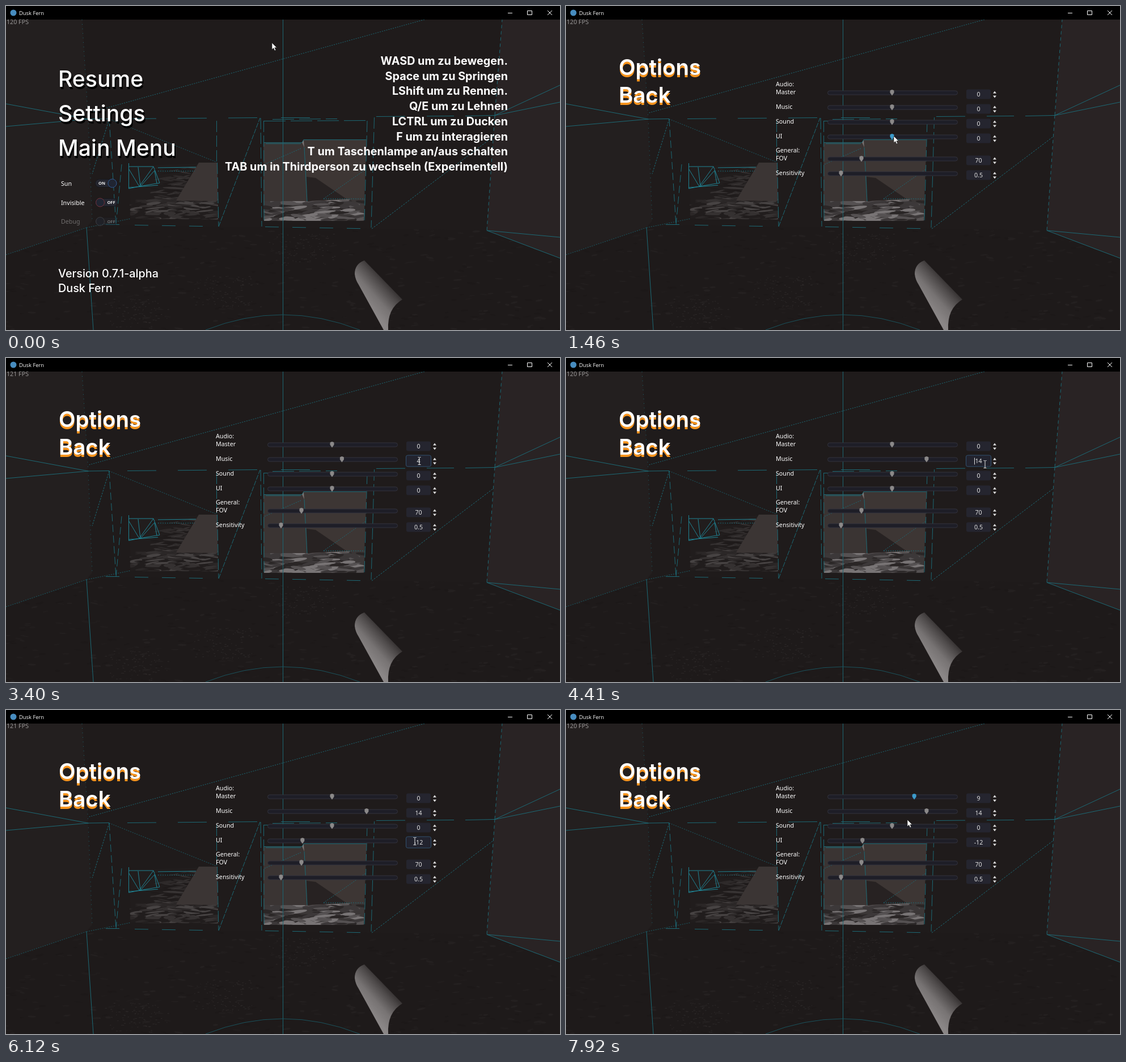
These frames come from a looping animation (977 by 573 pixels, 7990 ms). An HTML page with a canvas:

```html
<!DOCTYPE html>
<html lang="de">
<head>
<meta charset="utf-8">
<title>Dusk Fern</title>
<style>
html, body { margin: 0; width: 100%; height: 100%; overflow: hidden; background: #000; }
canvas { display: block; }
</style>
</head>
<body>
<canvas id="stage" width="977" height="573"></canvas>
<script>
const W = 977, H = 573, BAR = 24, LOOP = 7990;
const GAME = 'Dusk Fern';
const UI_FONT = '10.7px "Noto Sans", sans-serif';
let ctx;

function text(str, x, y, font, color = '#fff', align = 'left') {
  ctx.font = font;
  ctx.textAlign = align;
  ctx.fillStyle = color;
  ctx.fillText(str, x, y);
}

function shape(path, fill, stroke, width = 1) {
  const p = new Path2D(path);
  if (fill) { ctx.fillStyle = fill; ctx.fill(p); }
  if (stroke) { ctx.strokeStyle = stroke; ctx.lineWidth = width; ctx.stroke(p); }
}

function pill(x, y, w, h, r, fill, stroke) {
  ctx.beginPath();
  ctx.roundRect(x + .5, y + .5, w - 1, h - 1, r);
  ctx.fillStyle = fill;
  ctx.fill();
  ctx.strokeStyle = stroke;
  ctx.lineWidth = 1;
  ctx.stroke();
}

function disc(x, y, r, fill, stroke) {
  ctx.beginPath();
  ctx.arc(x, y, r, 0, 7);
  ctx.fillStyle = fill;
  ctx.fill();
  if (stroke) { ctx.strokeStyle = stroke; ctx.lineWidth = 1; ctx.stroke(); }
}

function wire(dash, path, color = '#1c6975') {
  ctx.setLineDash(dash);
  shape(path, null, color);
  ctx.setLineDash([]);
}

let seed = 7;
function rnd(a = 0, b = 1) {
  seed = (seed * 16807) % 2147483647;
  return a + (b - a) * seed / 2147483647;
}

// Scatters flat blotches inside a clipped area.
function blotches(clip, x, y, w, h, count, size, thick, colors) {
  ctx.save();
  ctx.clip(new Path2D(clip));
  for (let i = 0; i < count; i++) {
    ctx.fillStyle = colors[i % colors.length];
    ctx.beginPath();
    ctx.ellipse(x + rnd() * w, y + rnd() * h, rnd(.4, 1) * size, rnd(.35, 1) * thick, rnd(-.25, .2), 0, 7);
    ctx.fill();
  }
  ctx.restore();
}

function drawRoom() {
  ctx.fillStyle = '#1f1b1b';
  ctx.fillRect(0, 0, W, H);
  shape('M0 24H135L145 200 152 380 142 392 0 440Z', '#231f1f');
  shape('M875 24H977V446L848 397 862 193Z', '#292324');
  const floor = 'M142 392L220 388 848 397 977 446V573H0V440Z';
  shape(floor, '#1e1a1a');
  blotches(floor, 0, 392, W, 181, 420, 8, 2, ['#242020', '#1c1818', '#211d1d']);
  ctx.fillStyle = '#2d2929';
  for (let i = 0; i < 300; i++) {
    const k = i % 3;
    ctx.fillRect([390, 225, 520][k] + rnd(-45, 45) + rnd(-20, 20), [505, 545, 430][k] + rnd(-28, 28), rnd(1, 4), 1);
  }
}

function drawWindows() {
  const left = 'M217 283L373 277 374 378 220 376Z';
  shape(left, '#211d1d');
  blotches(left, 262, 284, 78, 58, 60, 22, 2, ['#2e2a2a', '#1e1a1a', '#383434']);
  blotches('M217 338L374 341V378L220 376Z', 216, 340, 160, 38, 110, 21, 3, ['#353131', '#211d1d', '#474343', '#2b2727']);
  shape('M340 277H373V345L300 344Z', '#3b3534');

  const ground = 'M454 345L633 340 631 380H455Z';
  shape(ground, '#3b3737');
  blotches(ground, 454, 342, 180, 39, 130, 20, 3.6, ['#555152', '#2a2626', '#787475', '#3c3839']);
  shape('M525 236H636L632 341 531 345Z', '#3d3634');
  shape('M531 345L530 302 546 304 600 341Z', '#272222');
  shape('M454 241H522L527 250 531 345H454Z', '#3a3433');
  shape('M522 241L525 236 526 250Z', '#7c7473');
}

function drawWires() {
  wire([], 'M488.5 24V573', '#1b6672');
  wire([], 'M0 173L145 200 182 199.5M0 213L145 200M142 392L154 573M862 193.5L977 140M862 193.5L977 170M848 397L977 409M848 397L977 446M810 194.5L862 193.5');
  wire([], 'M352 573Q488 519 624 573', '#1a525c');
  wire([2, 2], 'M738 24L146 189');
  wire([2, 2], 'M182 200L371 276M0 440L142 392M142 392L220 376', '#1a5b66');
  wire([3, 2], 'M645 394L858 232M182 200L152 297');
  wire([1, 7], 'M134 24L145 200 152 380');
  wire([13, 6], 'M182 200L194 387M204 280L194 387');
  wire([6, 5], 'M862 193L875 24M862 193L848 397');
  wire([51, 38], 'M214 199.5L449 197.5M485 197.5L545 197.5M653 195.5L790 194.5');
  wire([38, 9], 'M455 203.5L637 202.5M470 200.5L584 199.5');
  wire([20, 6], 'M371.5 203V276M372.5 277L375 390M449 198L451 390M454.5 203L455 380M637 203L632 380M649.5 197L644 392');
  wire([9, 2], 'M375 390L448 198');
  wire([24, 24], 'M227 387.5L371 390M457 390.5L645 394M176 386.5H200');
  wire([], 'M455 241.5H522L525 236.5H635M458 243.5H520M526 250L531 345');
  wire([2, 2], 'M456 280L520 252M560 341L634 289M268 292H333M560 341H630');
  wire([], 'M216.5 278V323L235 319 271 313 260 284H217M217 289L235 319 260 284M233 285L237 319 262 291 266 314M217 321L268 317M268 286L335 285', '#1f8494');
}

function drawCylinder() {
  const g = ctx.createLinearGradient(630, 522, 670, 486);
  g.addColorStop(0, '#8a8686');
  g.addColorStop(.4, '#777373');
  g.addColorStop(.8, '#4d4949');
  g.addColorStop(1, '#353131');
  shape('M632 450Q615 456 615 474 616 484 622 493L666 573H674Q672 535 699 519Z', g);
}

function drawTitleBar() {
  ctx.fillStyle = '#000';
  ctx.fillRect(0, 0, W, BAR);
  disc(13, 12, 5.5, '#478cbf');
  text(GAME, 23, 15.5, '9.4px "Open Sans", sans-serif');
  shape('M885 12.5H893M919.5 8.5H927.5V15.5H919.5ZM955 8L963 16M963 8L955 16', null, '#fff');
}

function toggle(label, y, on, color, alpha = 1) {
  ctx.globalAlpha = alpha;
  text(label, 97, y + 4, UI_FONT);
  pill(157, y - 7.5, 40, 15, 7, '#25262f', '#15161b');
  disc(on ? 187.5 : 166, y, 7.5, '#202532', color);
  text(on ? 'ON' : 'OFF', on ? 169 : 185.5, y + 2.8, 'bold 7.5px "Noto Sans", sans-serif', '#eee', 'center');
  ctx.globalAlpha = 1;
}

const HELP = ['WASD um zu bewegen.', 'Space um zu Springen', 'LShift um zu Rennen.', 'Q/E um zu Lehnen',
  'LCTRL um zu Ducken', 'F um zu interagieren', 'T um Taschenlampe an/aus schalten',
  'TAB um in Thirdperson zu wechseln (Experimentell)'];

function drawMenu(clicked) {
  if (clicked) pill(88, 168, 297, 44, 3, 'rgba(28,32,40,.4)', '#235064');
  ['Resume', 'Settings', 'Main Menu'].forEach((s, i) => {
    const font = '500 39.2px Inter, sans-serif', y = 143 + i * 61;
    text(s, 94, y + 4, font, '#000');
    text(s, 92, y, font);
  });
  HELP.forEach((s, i) => text(s, 885, 104 + i * 26.7, '700 19.8px Inter, sans-serif', '#fff', 'right'));
  toggle('Sun', 313.5, true, '#315b94');
  toggle('Invisible', 347.5, false, '#76323a');
  toggle('Debug', 381, false, '#777', .35);
  ['Version 0.7.1-alpha', GAME].forEach((s, i) => text(s, 92, 480 + i * 26, '500 19.8px Inter, sans-serif'));
}

// Value at time t from [start, value] steps.
function at(steps, t) {
  return steps.reduce((v, [start, next]) => t >= start ? next : v, steps[0][1]);
}

const MASTER = [[0, 0], [7080, 1], [7150, 3], [7220, 5], [7300, 7], [7380, 10], [7500, 9]];
const MUSIC = [[0, 0], [3400, 4], [3670, 14]];
const VOICE = [[0, 0], [5450, -8], [5710, 0], [5910, -1], [5980, -12]];
const FPS = [[0, 120], [400, 121], [1400, 120], [2370, 113], [3200, 121], [4150, 120], [5100, 118],
  [5480, 122], [6050, 121], [7000, 119], [7400, 121], [7780, 120]];

function row(label, y, value, knob, t, hot, focused) {
  text(label, 370, y + 2.5, UI_FONT);
  pill(461, y - 4, 230, 8, 4, '#1e1e27', '#33323c');
  shape(`M${knob - 3.5} ${y - 4}Q${knob} ${y - 7} ${knob + 3.5} ${y - 4}V${y}L${knob} ${y + 5} ${knob - 3.5} ${y}Z`,
    hot ? '#3c9bcb' : '#8b8989');
  if (focused) pill(705, y - 8, 45, 21, 3, '#22232e', '#30506f');
  else pill(706, y - 6, 43, 17, 2, '#25252f', '#25252f');
  text(value, 727.5, y + 6.5, UI_FONT, '#e0e0e0', 'center');
  if (focused && Math.floor(t / 650) % 2 === 0) {
    ctx.fillRect(Math.round(726.5 - ctx.measureText(value).width / 2), y - 3, 1, 12);
  }
  shape(`M753 ${y + 1}L756 ${y - 3} 759 ${y + 1}ZM753 ${y + 5}L756 ${y + 9} 759 ${y + 5}Z`, '#e0e0e0');
}

function drawOptions(t) {
  ['Options', 'Back'].forEach((s, i) => {
    const font = '600 38.4px Inter, sans-serif', y = 122 + i * 49;
    text(s, 93, y + 4, font, '#f7941d');
    text(s, 93, y, font);
  });
  text('Audio:', 370, 142, UI_FONT);
  text('General:', 370, 259, UI_FONT);
  const audio = (label, y, value, hot, focused) => row(label, y, value, 575 + value * 4.35, t, hot, focused);
  audio('Master', 153.5, at(MASTER, t), t > 6950);
  audio('Music', 179.5, at(MUSIC, t), false, t > 2900 && t < 4850);
  audio('Sound', 205.5, 0);
  audio('UI', 231.5, at(VOICE, t), t > 1400 && t < 1740, t >= 4850 && t < 7000);
  row('FOV', 270.5, 70, 521, t);
  row('Sensitivity', 296.5, 0.5, 485, t);
}

const MOUSE = [[0, 469, 65], [560, 168, 190], [830, 158, 183], [1400, 575, 230], [1550, 583, 231], [2050, 826, 258],
  [2440, 729, 187], [2900, 729, 182], [3670, 729, 182], [4210, 739, 188], [4410, 739, 188], [4850, 729, 232],
  [5510, 729, 232], [5910, 729, 232], [6120, 721, 232], [6600, 716, 230], [7000, 573, 152], [7480, 612, 156],
  [7920, 602, 194], [LOOP, 602, 196]];

function mouseAt(t) {
  const i = MOUSE.findIndex(k => k[0] > t);
  const [t0, x0, y0] = MOUSE[i - 1], [t1, x1, y1] = MOUSE[i];
  let u = (t - t0) / (t1 - t0);
  u *= u * (3 - 2 * u);
  return [x0 + (x1 - x0) * u, y0 + (y1 - y0) * u];
}

function drawMouse(t) {
  const [x, y] = mouseAt(t).map(Math.round);
  const overField = t > 1400 && x > 705 && x < 750 && [156, 182, 208, 234].some(c => Math.abs(y - c) < 9);
  ctx.save();
  ctx.translate(x, y);
  if (overField) shape('M-2.5 -6.5H-.5M.5 -6.5H2.5M0 -6V6M-2.5 6.5H2.5', null, '#e8e8e8');
  else shape('M0 0V12L2.8 9.4 4.8 14 6.8 13 4.9 8.7H8.6Z', '#fff', '#222', .7);
  ctx.restore();
}

// Share of the diagonal slide from menu to options.
function slideAt(t) {
  const u = Math.min(1, Math.max(0, (t - 601) / 550));
  return u < .5 ? 4 * u ** 3 : 1 - 4 * (1 - u) ** 3;
}

function page(shift, draw) {
  if (Math.abs(shift) >= 1) return;
  ctx.save();
  ctx.translate(shift * W, shift * (H - BAR));
  draw();
  ctx.restore();
}

const stage = document.getElementById('stage').getContext('2d');
const room = document.createElement('canvas');
room.width = W;
room.height = H;
ctx = room.getContext('2d');
[drawRoom, drawWindows, drawWires, drawCylinder].forEach(draw => draw());
ctx = stage;

function render(now) {
  const t = now % LOOP, slide = slideAt(t);
  ctx.drawImage(room, 0, 0);
  page(-slide, () => drawMenu(t > 560));
  page(1 - slide, () => drawOptions(t));
  text(at(FPS, t) + ' FPS', 1, 32, UI_FONT, '#989696');
  drawTitleBar();
  drawMouse(t);
  requestAnimationFrame(render);
}
requestAnimationFrame(render);
</script>
</body>
</html>
```
